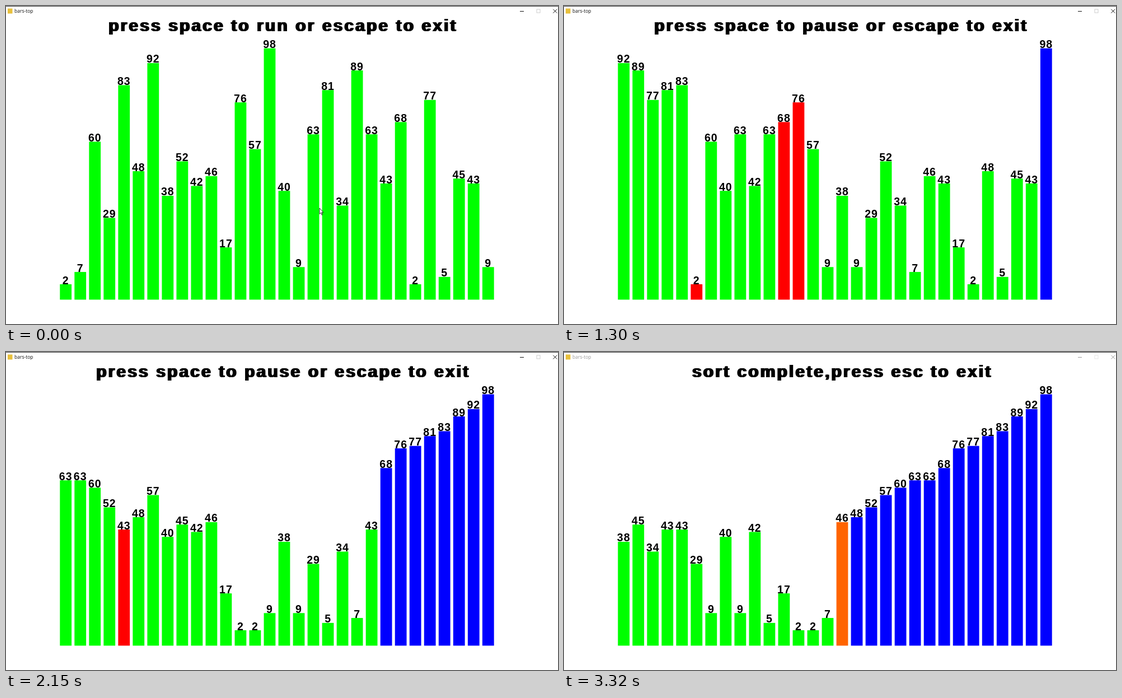
Write an HTML page that moves like this. It is 986 px wide and 568 px high and loops after 3360 ms.

```html
<!DOCTYPE html>
<html lang="en">
<head>
<meta charset="utf-8">
<title>Heap selection</title>
<style>
  html, body { margin: 0; width: 100%; height: 100%; overflow: hidden; background: #fff; }
  svg { display: block; width: 986px; height: 568px; }
  text { white-space: pre; }
  .heading { font: bold 30px "Liberation Sans", Arial, sans-serif; letter-spacing: 3.1px; }
  .label { font: bold 19.5px "Liberation Sans", Arial, sans-serif; letter-spacing: 1px; text-anchor: middle; }
  .caption { font: 8.5px "Open Sans", "Noto Sans", sans-serif; }
</style>
</head>
<body>
<svg id="stage" viewBox="0 0 986 568"></svg>
<script>
const LOOP = 3360, START = 410, END = 2880;
const VALUES = [2, 7, 60, 29, 83, 48, 92, 38, 52, 42, 46, 17, 76, 57, 98,
                40, 9, 63, 81, 34, 89, 63, 43, 68, 2, 77, 5, 45, 43, 9];
const PICK = 15;
const GREEN = '#00ff00', RED = '#ff0000', BLUE = '#0000ff', ORANGE = '#ff6400';
const BASE = 524.5;

const stage = document.getElementById('stage');

function add(tag, attrs, text = '') {
  const el = document.createElementNS('http://www.w3.org/2000/svg', tag);
  set(el, attrs);
  el.textContent = text;
  return stage.appendChild(el);
}

function set(el, attrs) {
  for (const key in attrs) el.setAttribute(key, attrs[key]);
}

// Every visible step of the heap selection.
function sortStates() {
  const a = [...VALUES], states = [];
  const snap = (reds, n) => states.push({ a: [...a], reds, n });
  const swap = (i, j) => { [a[i], a[j]] = [a[j], a[i]]; };

  function sift(i, n) {
    for (;;) {
      snap([i], n);
      const left = 2 * i + 1, right = left + 1;
      if (left >= n) return;
      snap([i, left], n);
      let top = a[left] > a[i] ? left : i;
      if (right < n) {
        snap([i, left, right], n);
        if (a[right] > a[top]) top = right;
      }
      if (top === i) return;
      swap(i, top);
      i = top;
    }
  }

  for (let i = a.length / 2 - 1; i >= 0; i--) sift(i, a.length);
  for (let n = a.length - 1; n > PICK; n--) {
    swap(0, n);
    sift(0, n);
  }
  swap(0, PICK);
  snap([], PICK + 1);
  return states;
}

const states = sortStates();
const idle = { a: VALUES, reds: [], n: VALUES.length };

// Recorded tick -> sort step
const PACE = [[0, 0], [6, 24], [13, 53], [16, 67], [28, 117], [43, 175], [54, 217],
              [61, states.length - 1]];
// Time -> pointer position
const POINTER = [[930, 560, 361], [1010, 584, 376], [1050, 604, 390], [1130, 618, 440],
                 [1260, 632, 556], [1300, 634, 580]];

function along(points, x) {
  if (x <= points[0][0]) return points[0].slice(1);
  for (let i = 1; i < points.length; i++) {
    const p = points[i - 1], q = points[i];
    if (x < q[0]) {
      return p.slice(1).map((v, k) => v + (q[k + 1] - v) * (x - p[0]) / (q[0] - p[0]));
    }
  }
  return points[points.length - 1].slice(1);
}

// Ticks last 40 ms, every 17th one 50 ms.
const tickTime = k => START + 40 * k + 10 * Math.max(0, Math.floor((k - 4) / 17));

function tickAt(t) {
  let k = -1;
  while (k < 61 && tickTime(k + 1) <= t) k++;
  return k;
}

// Window frame
add('rect', { width: 986, height: 568, fill: '#fff' });
add('rect', { width: 986, height: 1, fill: '#444' });
add('rect', { x: 3, y: 4.5, width: 8.5, height: 9, fill: '#e8c03c' });
const caption = add('text', { class: 'caption', x: 15, y: 12.3 }, 'bars-top');
const buttons = add('path', { d: 'M918 9.5h7M977.3 5.7l6.9 6.9M984.2 5.7l-6.9 6.9', fill: 'none' });
const maximise = add('rect', { x: 948, y: 6, width: 6, height: 6, fill: 'none' });

// Extra copies widen the strokes sideways.
const heading = [0, 1.2, 2.4].map(dx =>
  add('text', { class: 'heading', y: 45, transform: `translate(${dx})` }));

const bars = VALUES.map((_, i) => {
  const x = 96.3 + 26.02 * i;
  return {
    rect: add('rect', { x, width: 20.8 }),
    label: add('text', { class: 'label', x: x + 10.4 })
  };
});

const pointer = add('path', {
  d: 'M0 0V10.5L2.4 8.3L4 12.2L5.5 11.6L3.9 7.8H7Z',
  fill: '#fff', stroke: '#000', 'stroke-width': 0.8
});

function drawBars({ a, reds, n }, done) {
  bars.forEach(({ rect, label }, i) => {
    const height = 18.7 + 4.39 * a[i], y = BASE - height;
    const fill = done && i === PICK ? ORANGE : i >= n ? BLUE : reds.includes(i) ? RED : GREEN;
    set(rect, { y, height, fill });
    set(label, { y: y - 0.5 });
    label.textContent = a[i];
  });
}

function drawHeading(t) {
  const [x, words] = t < START ? [182, 'press space to run or escape to exit']
    : t < END ? [160, 'press space to pause or escape to exit']
    : [227.8, 'sort complete,press esc to exit'];
  for (const el of heading) {
    set(el, { x });
    el.textContent = words;
  }
}

function drawFrame(t) {
  const [ink, faint] = t < 3280 ? ['#111', '#ccc'] : t < 3320 ? ['#555', '#d8d8d8'] : ['#999', '#e6e6e6'];
  set(caption, { fill: ink });
  set(buttons, { stroke: ink });
  set(maximise, { stroke: faint });
}

function draw(t) {
  const k = tickAt(t);
  const state = k < 0 ? idle : states[Math.floor(along(PACE, k)[0])];
  drawBars(state, t >= END);
  drawHeading(t);
  drawFrame(t);
  const [x, y] = along(POINTER, k < 0 ? 0 : tickTime(k));
  set(pointer, { transform: `translate(${x} ${y})` });
}

const began = performance.now();
function loop() {
  draw((performance.now() - began) % LOOP);
  requestAnimationFrame(loop);
}
loop();
</script>
</body>
</html>
```
